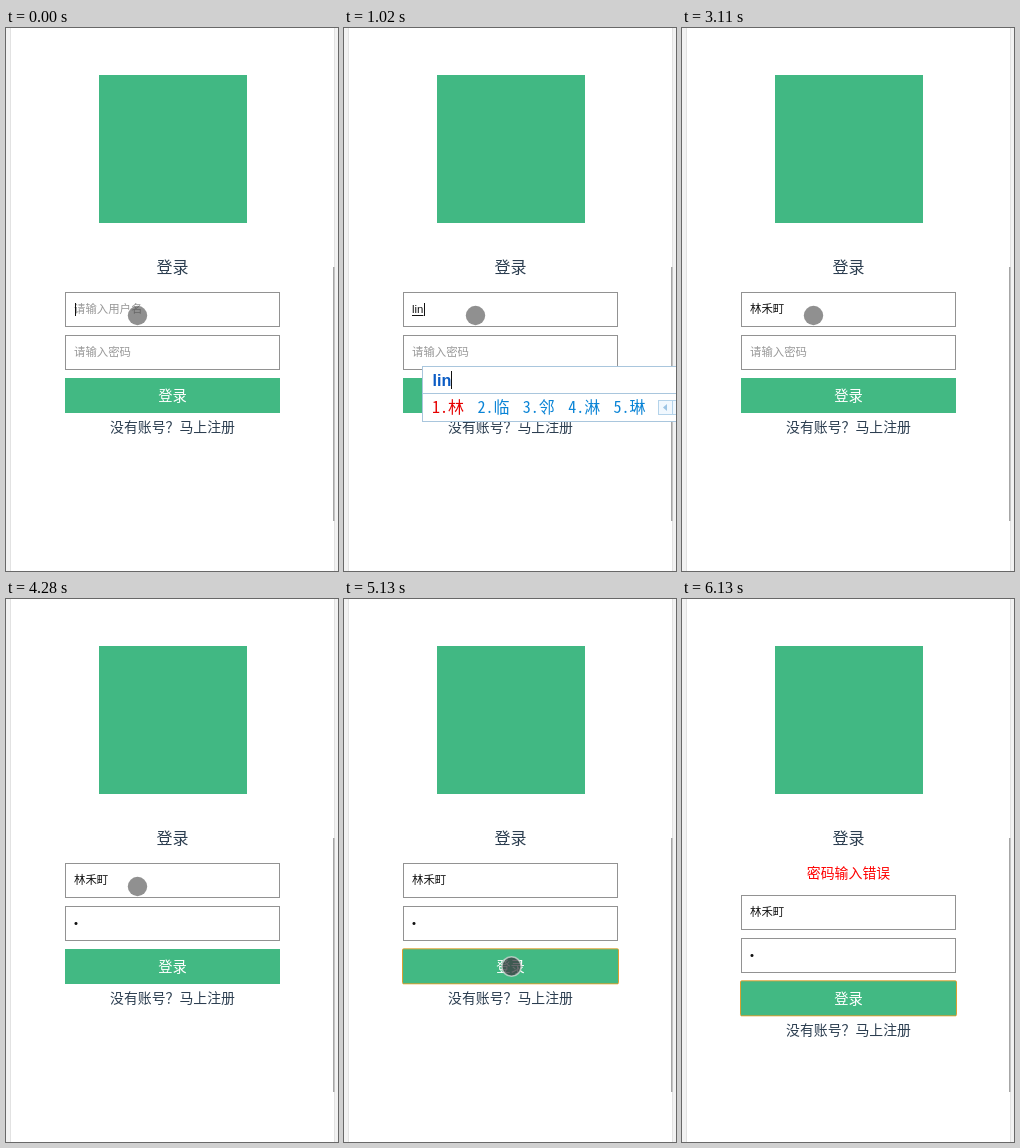
An HTML page for the animation above (6.59 s loop, 332x543 px).

```html
<!DOCTYPE html>
<html lang="zh-CN">
<head>
<meta charset="utf-8">
<title>登录</title>
<style>
  html, body { margin: 0; width: 100%; height: 100%; overflow: hidden; background: #fff; }
  svg { display: block; width: 100vw; height: 100vh; }
  text { font-family: "Noto Sans CJK SC", "Noto Sans CJK", sans-serif; font-size: 13.9px; fill: #2c3e50; white-space: pre; }
  .mid { text-anchor: middle; }
  .title { font-size: 16px; font-weight: 500; }
  .label { font-size: 14.3px; font-weight: 500; fill: #fff; }
  .error { fill: #f00; }
  .field { fill: #fff; stroke: #929292; }
  .value { font-family: "Liberation Sans", "Noto Sans CJK SC", "Noto Sans CJK", sans-serif; font-size: 11.4px; fill: #111; }
  .hint { font-size: 11.4px; fill: #999; }
  .caret { fill: #111; }
  .pinyin { font: bold 16.2px "Liberation Sans", sans-serif; fill: #0b5cc4; }
  .word { font-family: "Noto Sans Mono CJK SC", "Noto Sans CJK SC", "Noto Sans CJK", sans-serif; font-size: 16px; font-weight: 300; fill: #0a84d6; }
  .word:first-child { fill: #e60000; }
  .pointer { fill: rgba(70, 70, 70, .6); }
  .pointer.down { fill: rgba(62, 62, 66, .78); stroke: rgba(205, 215, 210, .8); stroke-width: 1.6; }
</style>
</head>
<body>
<svg viewBox="0 0 332 543" preserveAspectRatio="none">
  <rect width="332" height="543" fill="#f2f2f2"/>
  <rect x="4" width="325" height="543" fill="#e2e2e2"/>
  <rect x="5" width="323" height="543" fill="#fff"/>
  <rect x="327" y="239" width="1.5" height="254" fill="#a6a6a6"/>
  <rect x="93" y="47" width="148" height="148" fill="#41b883"/>
  <text class="mid title" x="166.5" y="245">登录</text>
  <text class="mid error" id="error" x="166.5" y="279.3">密码输入错误</text>

  <g id="form">
    <rect class="field" x="59.5" y="264.5" width="214" height="34"/>
    <text class="hint" id="nameHint" x="68" y="285.3">请输入用户名</text>
    <text class="value" id="name" x="68" y="285.3"></text>
    <rect id="underline" x="68" y="287" height="1" fill="#111"/>
    <rect class="caret" id="nameCaret" y="275" width="1" height="13"/>

    <rect class="field" x="59.5" y="307.5" width="214" height="34"/>
    <text class="hint" id="passHint" x="68" y="328.3">请输入密码</text>
    <text class="value" id="pass" x="68" y="328.3">•</text>
    <rect class="caret" id="passCaret" y="318" width="1" height="13"/>

    <rect x="59" y="350" width="215" height="35" fill="#42b983"/>
    <rect id="ring" x="58.5" y="349.8" width="216" height="35" rx="1" fill="none" stroke="#d9a032"/>
    <text class="mid label" x="166.5" y="373.2">登录</text>
    <text class="mid" x="166.5" y="404.2">没有账号？马上注册</text>
  </g>

  <g id="ime">
    <rect x="78.5" y="338.5" width="300" height="55" fill="#fff" stroke="#a9c6dd"/>
    <path d="M79 365.5H332" stroke="#a9c6dd"/>
    <text class="pinyin" id="pinyin" x="88.5" y="358"></text>
    <rect id="imeCaret" y="343" width="1" height="18"/>
    <g id="words"></g>
    <g id="pager" stroke="#b4d3ea" fill="#f1f8fe">
      <rect x="314.5" y="372.5" width="14" height="14"/>
      <rect x="328.5" y="372.5" width="14" height="14"/>
      <path d="M323 376v7l-4 -3.5z" fill="#9cc4e4" stroke="none"/>
    </g>
  </g>

  <circle class="pointer" id="pointer" r="9.7"/>
</svg>

<script>
const LOOP = 6590;
const NAME = '林禾町';
const $ = id => document.getElementById(id);
const show = (id, on) => $(id).style.display = on ? '' : 'none';
const within = (t, ...spans) => spans.some(([a, b]) => t >= a && t < b);

// [time, pinyin, candidates]
const typing = [
  [620, 'l', '了 来 老 里 两'],
  [770, 'li', '里 力 离 立 利'],
  [920, 'lin', '里 力 离 立 利'],
  [1020, 'lin', '林 临 邻 淋 琳'],
  [1150, "lin'h", '临湖 淋화 林火 临海'.replace('화', '花')],
  [1310, "lin'he", '临河 林荷 邻和 林鹤'],
  [1880, "lin'he'd", '林禾町 林禾笛 林禾棣 林禾冬'],
];
const TYPED = 2330, PASS = 2650, DOT = 3730, PRESS = 5130, FAIL = 5290;

// [start, step length, steps, from, to]
const moves = [
  [4360, 76.6, 7, [131.5, 287.5], [167.5, 367.5]],
  [5740, 77.5, 5, [167.5, 367.5], [302, 540]],
];
const GONE = 6130;

const ease = k => k * k * (3 - 2 * k);

function pointerAt(t) {
  let pos = moves[0][3];
  for (const [start, len, steps, from, to] of moves) {
    if (t < start) break;
    const k = ease(Math.min(1, (Math.floor((t - start) / len) + 1) / steps));
    pos = from.map((v, i) => v + (to[i] - v) * k);
  }
  return pos;
}

function setText(id, s) {
  if ($(id).textContent !== s) $(id).textContent = s;
  return s ? $(id).getComputedTextLength() : 0;
}

let shown = '';
function setWords(list) {
  if (list === shown) return;
  shown = list;
  const words = list.split(' ');
  const pitch = 16 * words[0].length + 29.4;
  $('words').replaceChildren(...words.map((word, i) => {
    const el = document.createElementNS('http://www.w3.org/2000/svg', 'text');
    el.setAttribute('class', 'word');
    el.setAttribute('x', 88 + i * pitch);
    el.setAttribute('y', 385.3);
    el.textContent = `${i + 1}.${word}`;
    return el;
  }));
  show('pager', words[0].length === 1);
}

function draw(t) {
  const key = t < TYPED ? typing.filter(k => k[0] <= t).pop() : null;
  show('ime', key);
  const value = key ? key[1].replaceAll("'", '') : t >= TYPED ? NAME : '';
  const width = setText('name', value);
  show('nameHint', !value);
  show('underline', key);
  $('underline').setAttribute('width', width);
  show('nameCaret', within(t, [0, 80], [540, PASS]));
  $('nameCaret').setAttribute('x', Math.round(68.5 + width));

  if (key) {
    const w = setText('pinyin', key[1]);
    $('imeCaret').setAttribute('x', Math.round(88.5 + w));
    $('imeCaret').setAttribute('fill', t >= 1880 ? '#e00000' : '#111');
    setWords(key[2]);
  }

  show('passHint', t < DOT);
  show('pass', t >= DOT);
  show('passCaret', within(t, [PASS, 3110], [3660, 4280], [4820, PRESS]));
  $('passCaret').setAttribute('x', t < DOT ? 68 : 73);

  show('ring', t >= PRESS);
  show('error', t >= FAIL);
  $('form').setAttribute('transform', `translate(0 ${t >= FAIL ? 32 : 0})`);

  const [x, y] = pointerAt(t);
  $('pointer').setAttribute('transform', `translate(${x} ${y})`);
  $('pointer').classList.toggle('down', within(t, [PRESS, FAIL]));
  show('pointer', t < GONE);
}

const begin = performance.now();
function tick() {
  draw((performance.now() - begin) % LOOP);
  requestAnimationFrame(tick);
}
tick();
</script>
</body>
</html>
```
